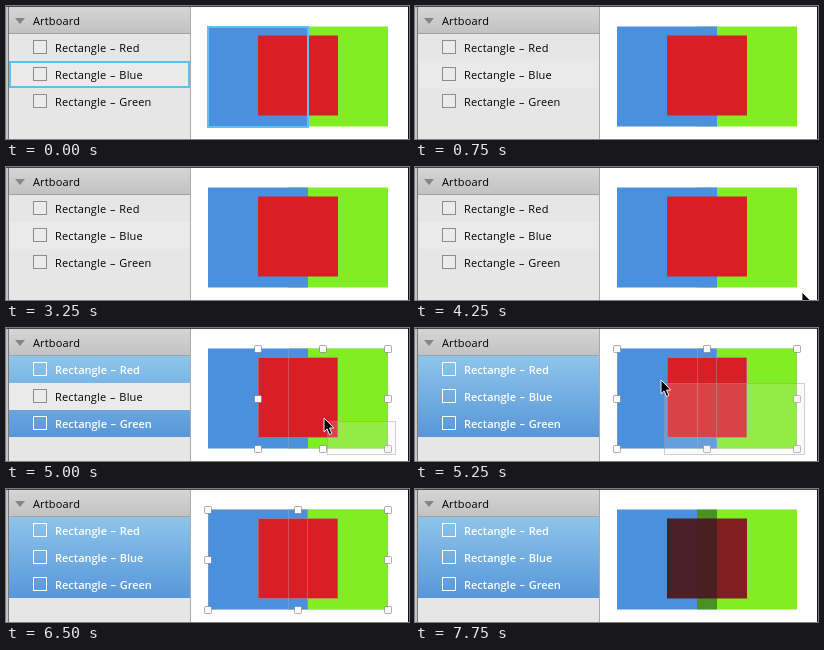
Animation, 403 px wide and 133 px high, one loop 8 s. Source, as an HTML page:

```html
<!DOCTYPE html>
<html lang="en">
<head>
<meta charset="utf-8">
<style>
  html, body { margin: 0; width: 100%; height: 100%; overflow: hidden; background: #fff; }
  svg { display: block; }
  text { font: 500 11px "Open Sans", "Noto Sans", sans-serif; letter-spacing: .15px; word-spacing: .7px; fill: #000; }
  .box { fill: #ebebeb; stroke: #8c8c8c; }
  .on text { fill: #fff; font-weight: 600; letter-spacing: 0; }
  .on .box { fill: none; stroke: #fff; }
  .bg { fill: none; }
  .on .bg { fill: url(#select); }
  .hover { fill: none; stroke: #58c3ee; stroke-width: 2; }
  .edge { fill: none; stroke: #aaa; stroke-opacity: .38; }
  .handle { fill: #fafafa; stroke: #6e6e6e; stroke-opacity: .55; }
  #shapes { isolation: isolate; }
  .darken rect { mix-blend-mode: darken; }
</style>
</head>
<body>
<svg width="403" height="133" viewBox="0 0 403 133">
  <defs>
    <linearGradient id="head" x2="0" y2="1">
      <stop stop-color="#d6d6d6"/><stop offset="1" stop-color="#c2c2c2"/>
    </linearGradient>
    <linearGradient id="select" gradientUnits="userSpaceOnUse" x1="0" y1="28" x2="0" y2="109">
      <stop stop-color="#8dc5ea"/><stop offset="1" stop-color="#5896d8"/>
    </linearGradient>
  </defs>
  <rect width="403" height="133" fill="#fff"/>
  <rect width="185" height="133" fill="#e6e6e6"/>
  <rect y="55" width="185" height="27" fill="#eaeaea"/>
  <rect width="185" height="27" fill="url(#head)"/>
  <rect y="27" width="185" height="1" fill="#a2a2a2"/>
  <path d="M9 12h10l-5 6z" fill="#868686"/>
  <text x="27" y="19">Artboard</text>
  <g id="rows"></g>
  <rect width="2" height="133" fill="#c4c4c4"/>
  <rect x="2" width="1" height="133" fill="#777"/>
  <rect x="184" width="1" height="133" fill="#aaa"/>
  <rect width="403" height="1" fill="#444"/>
  <rect x="402" width="1" height="133" fill="#111"/>
  <g id="shapes"></g>
  <g id="overlay"></g>
  <rect id="marquee" fill="#e1e1e1" fill-opacity=".18" stroke="#999" stroke-opacity=".45"/>
  <path id="cursor" d="M0 0v13.8l3.1-2.9 2.4 5.6 2.4-1-2.4-5.5h4.3z" fill="#000" stroke="#fff" stroke-width=".9"/>
</svg>
<script>
const LOOP = 8000, STEP = 250;
const $ = id => document.getElementById(id);
const layers = [
  { name: 'Red', x: 252, y: 29.5, w: 80, h: 80, fill: '#d81f27' },
  { name: 'Blue', x: 202, y: 20.5, w: 100, h: 100, fill: '#4a90de' },
  { name: 'Green', x: 282, y: 20.5, w: 100, h: 100, fill: '#80ee22' },
];
const [RED, BLUE, GREEN] = [0, 1, 2];

const rect = (x, y, w, h, attrs) =>
  `<rect x="${x}" y="${y}" width="${w}" height="${h}" ${attrs}/>`;

$('rows').innerHTML = layers.map(({ name }, i) => {
  const y = 28 + 27 * i;
  return `<g>${rect(3, y, 181, 27, 'class="bg"')}${rect(27.5, y + 6.5, 13, 13, 'class="box"')}
    <text x="49" y="${y + 18}">Rectangle – ${name}</text></g>`;
}).join('');
$('shapes').innerHTML = [...layers].reverse()
  .map(l => rect(l.x, l.y, l.w, l.h, `fill="${l.fill}"`)).join('');

// Each state holds from its time until the next one.
const all = [RED, BLUE, GREEN];
const dragStart = [389.5, 126.5];
const states = [
  { at: 0, hover: BLUE },
  { at: 250, hover: GREEN },
  { at: 500 },
  { at: 2000, cursor: [371, 129] },
  { at: 2250, cursor: [370, 127] },
  { at: 2500, cursor: [375, 128] },
  { at: 2750 },
  { at: 4250, cursor: [387, 125] },
  { at: 4500, cursor: [385, 121] },
  { at: 4750, cursor: [389, 126] },
  { at: 5000, cursor: [318, 90], drag: true, selected: [RED, GREEN], handles: true },
  { at: 5250, cursor: [246, 52], drag: true, selected: all, handles: true },
  { at: 5500, cursor: [239, 47], drag: true, selected: all, handles: true },
  { at: 5750, selected: all, handles: true },
  { at: 7500, selected: all, handles: true, darken: true },
  { at: 7750, selected: all, darken: true },
];

function hoverMarks(i) {
  const l = layers[i];
  return rect(4, 56 + 27 * (i - 1), 179, 25, 'class="hover"') +
    rect(l.x, l.y + .5, l.w, l.h, 'class="hover"');
}

function selectionMarks(indices) {
  const picked = indices.map(i => layers[i]);
  const left = Math.min(...picked.map(l => l.x)), right = Math.max(...picked.map(l => l.x + l.w));
  const top = 21, middle = 71, bottom = 121;
  let marks = picked.map(l => rect(l.x + .5, l.y, l.w - 1, l.h, 'class="edge"')).join('');
  for (const x of [left, (left + right) / 2, right])
    for (const y of [top, middle, bottom])
      if (x === left || x === right || y !== middle)
        marks += rect(x - 3.5, y - 3.5, 7, 7, 'class="handle" rx="1"');
  return marks;
}

function show({ hover, cursor, drag, selected = [], handles, darken }) {
  [...$('rows').children].forEach((row, i) => row.classList.toggle('on', selected.includes(i)));
  $('shapes').classList.toggle('darken', !!darken);
  $('overlay').innerHTML = hover !== undefined ? hoverMarks(hover)
    : handles ? selectionMarks(selected) : '';
  $('cursor').style.display = cursor ? '' : 'none';
  $('marquee').style.display = drag ? '' : 'none';
  if (cursor) $('cursor').setAttribute('transform', `translate(${cursor})`);
  if (drag) {
    const [x, y] = cursor.map(c => c + 3.5);
    const box = { x, y, width: dragStart[0] - x, height: dragStart[1] - y };
    for (const key in box) $('marquee').setAttribute(key, box[key]);
  }
}

let current;
function tick() {
  const time = Math.floor(performance.now() % LOOP / STEP) * STEP;
  const state = states.findLast(s => s.at <= time);
  if (state !== current) show(current = state);
  requestAnimationFrame(tick);
}
tick();
</script>
</body>
</html>
```
